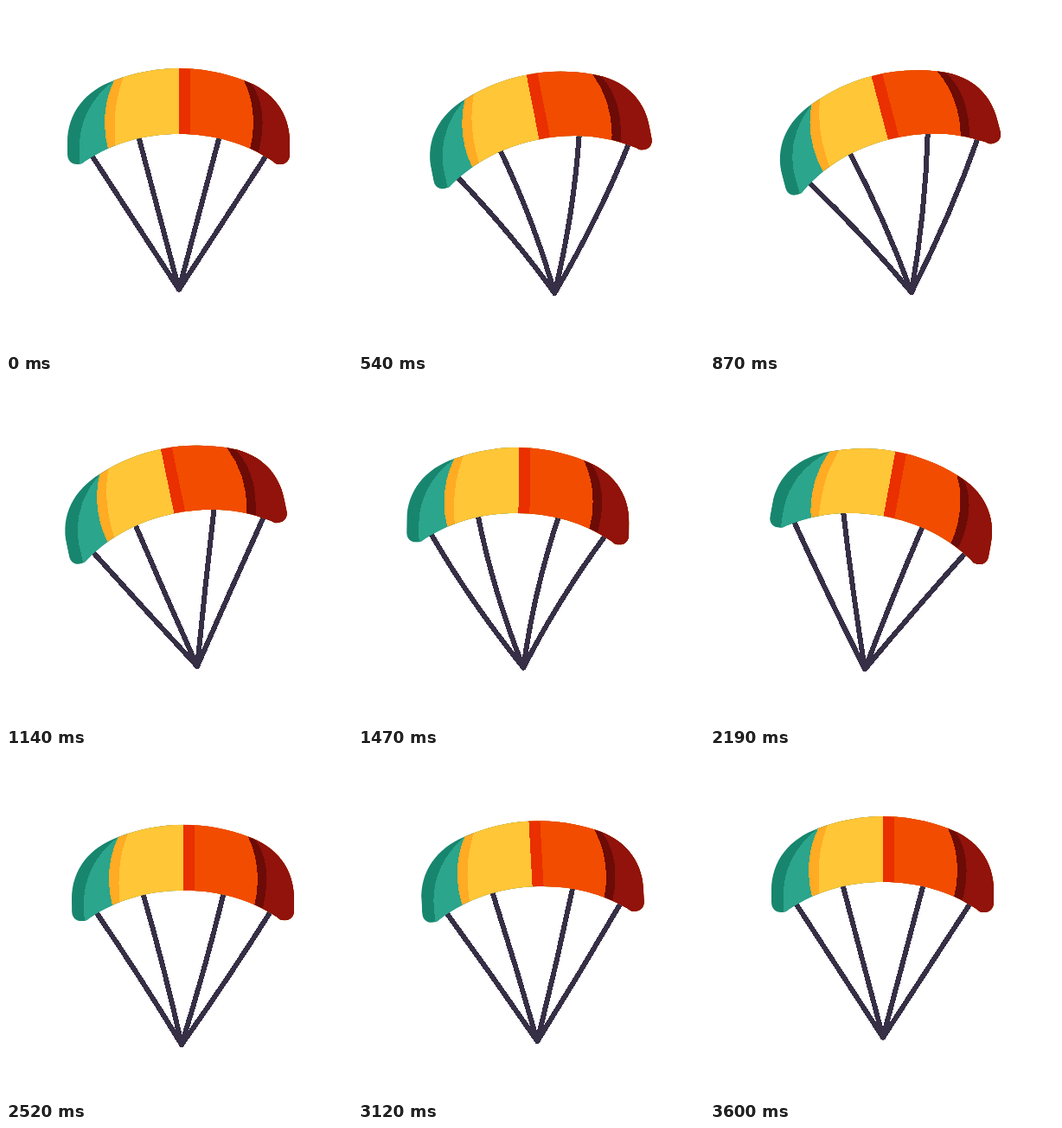
An HTML page that plays this animation: 400x400 px, repeating every 3.66 s.

```html
<!DOCTYPE html>
<html lang="en">
<head>
<meta charset="utf-8">
<title>Swaying parachute</title>
<style>
  html, body { margin: 0; width: 100%; height: 100%; overflow: hidden; background: #fff; }
  svg { display: block; width: 100%; height: 100%; shape-rendering: crispEdges; }
</style>
</head>
<body>
<svg viewBox="0 0 400 400">
  <clipPath id="cloth">
    <path d="M71 171V158C71 123 92 98 125 86C149 77 175 72 200 72S251 77 275 86C308 98 328 123 328 158V171C328 179 323 183 317 183S311 181 308 179C276 158 240 148 200 148S124 158 92 179C89 181 88 183 82 183S71 179 71 171Z"/>
  </clipPath>
  <path id="cords" fill="none" stroke="#362f45" stroke-width="6" stroke-linecap="round"/>
  <g id="canopy">
    <g clip-path="url(#cloth)">
      <path fill="#18866e" d="M60 60H340V200H60Z"/>
      <path fill="#2ba58c" d="M125 60V86C97 107 85 135 85 162L86 200H340V60Z"/>
      <path fill="#ffab24" d="M125 60V86C113 110 111 140 118 165V200H340V60Z"/>
      <path fill="#ffc637" d="M136 60V82C126 108 124 130 126.500 162V200H340V60Z"/>
      <path fill="#ea2f00" d="M200 60H340V200H200Z"/>
      <path fill="#f24c00" d="M213 60H340V200H213Z"/>
      <path fill="#6d0b07" d="M275 60V86C287 110 289 140 282 166V200H340V60Z"/>
      <path fill="#91130b" d="M282 60V87C299 110 300 140 291 172V200H340V60Z"/>
    </g>
  </g>
</svg>
<script>
  const LOOP = 3660, LAST = 3600, STEP = 30;
  const PIVOT = { x: 200, y: 170 }, ARM = 157.7;
  const anchors = [[98, 171], [153, 150], [247, 150], [302, 171]];

  // Turning points as [ms, value]
  const driftX = [[0, 0], [640, 14], [1630, -15.8], [2660, 5.5], [LAST, 0]];
  const driftY = [[0, 0], [600, 5.8], [1200, 5.8], [2680, 9.8], [LAST, 0]];
  const tilt = [[0, 0], [840, -14.7], [2000, 11.8], [2820, -4.5], [LAST, 0]];

  const ease = u => u * u * u * (u * (u * 6 - 15) + 10);

  function sample(keys, t) {
    const i = Math.max(1, keys.findIndex(([ms]) => ms >= t));
    const [t0, v0] = keys[i - 1], [t1, v1] = keys[i];
    return v0 + (v1 - v0) * ease((t - t0) / (t1 - t0));
  }

  const canopy = document.getElementById('canopy');
  const cords = document.getElementById('cords');

  function draw(t) {
    const x = sample(driftX, t), y = sample(driftY, t), deg = sample(tilt, t);
    const rad = deg * Math.PI / 180, cos = Math.cos(rad), sin = Math.sin(rad);
    const px = PIVOT.x + x, py = PIVOT.y + y;
    canopy.setAttribute('transform',
      `translate(${x} ${y}) rotate(${deg} ${PIVOT.x} ${PIVOT.y})`);

    // The knot trails the canopy and the cords bow with the drift
    const tx = PIVOT.x + 0.5 * x - 1.85 * deg;
    const ty = PIVOT.y + 0.85 * y + Math.sqrt(ARM ** 2 - (tx - px) ** 2);
    cords.setAttribute('d', anchors.map(([ax, ay]) => {
      const dx = ax - PIVOT.x, dy = ay - PIVOT.y;
      const sx = px + dx * cos - dy * sin, sy = py + dx * sin + dy * cos;
      return `M${sx} ${sy}Q${(sx + tx) / 2 + 0.6 * x} ${(sy + ty) / 2} ${tx} ${ty}`;
    }).join(''));
  }

  const start = performance.now();
  function tick() {
    const t = (performance.now() - start) % LOOP;
    draw(Math.min(LAST, Math.floor(t / STEP) * STEP));
    requestAnimationFrame(tick);
  }
  tick();
</script>
</body>
</html>
```
